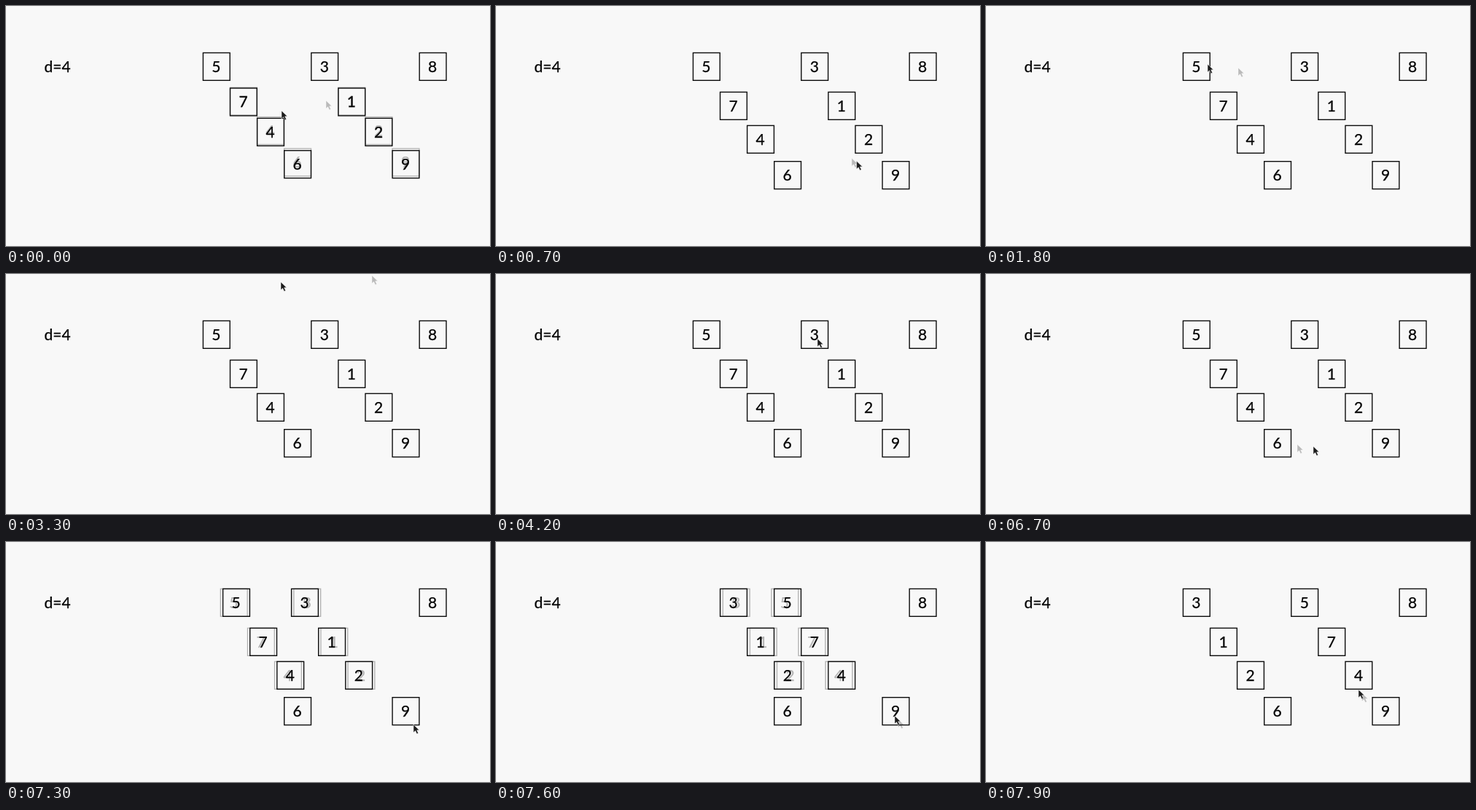
Write an HTML page that moves like this. It is 664x330 px and loops after 8 s.

```html
<!DOCTYPE html>
<html lang="en">
<head>
<meta charset="utf-8">
<title>Shell sort, gap 4</title>
<style>
  html, body { margin: 0; width: 100%; height: 100%; overflow: hidden; background: #f8f8f8; }
  svg { display: block; width: 664px; height: 330px; }
  text { font: 21px Lato, Carlito, sans-serif; fill: #000; stroke: #000; stroke-width: .25; }
  .box text { text-anchor: middle; }
  .box rect { fill: none; stroke: #0c0c0c; stroke-width: 1.4; }
  .ghost { opacity: .28; }
  .arrow { fill: #1c1c1c; stroke: #f8f8f8; stroke-width: .5; }
</style>
</head>
<body>
<svg viewBox="0 0 664 330">
  <text x="52.5" y="90.8">d=4</text>
  <g id="stage"></g>
</svg>
<script>
const LOOP = 8000, STEP = 100;
const GAP = 4, LEFT = 270.4, TOP = 64.4, COLUMN = 37.1;
const rows = [0, 54, 100, 149.3];
const digits = [...'574631298'];
const MOVE = 750, DROP_AT = -603, SWAP_AT = 7095;
const BOX_LAG = 14, ARROW_LAG = 40;

// pointer stops: time, x, y
const stops = [
  [-40, 439, 130], [0, 378, 144], [900, 528, 233], [1000, 566, 233],
  [1300, 566, 233], [1760, 346, 85], [1800, 304, 80], [2200, 285, 95],
  [2500, 137, 76], [3100, 628, 115], [3260, 502, 2], [3300, 377, 11],
  [3400, 178, 75], [3500, 331, 131], [4000, 441, 89], [4500, 441, 89],
  [4700, 562, 60], [5100, 258, 85], [5600, 338, 159], [6300, 500, 190],
  [6600, 394, 230], [6900, 559, 251], [7500, 559, 251], [7900, 511, 203]
];

const stage = document.getElementById('stage');

function add(parent, tag, attrs) {
  const el = document.createElementNS('http://www.w3.org/2000/svg', tag);
  for (const name in attrs) el.setAttribute(name, attrs[name]);
  return parent.appendChild(el);
}

function makeLayer(name) {
  const layer = add(stage, 'g', { class: name });
  const tiles = digits.map(digit => {
    const g = add(layer, 'g', { class: 'box' });
    add(g, 'rect', { width: 36.8, height: 37.9 });
    add(g, 'text', { x: 18, y: 26.4 }).textContent = digit;
    return g;
  });
  const arrow = add(layer, 'path', { class: 'arrow', d: 'M0 0V11L2.6 8.6L4.6 12.8L6.6 11.9L4.7 7.8H8Z' });
  return { tiles, arrow };
}

const ghost = makeLayer('ghost'), solid = makeLayer('solid');

function ease(t, start) {
  const u = Math.min(1, Math.max(0, (t - start) / MOVE));
  return u * u * (3 - 2 * u);
}

// Boxes drop into one row per subsequence, then the first three of each group trade places.
function boxAt(i, t) {
  const row = i % GAP;
  const jump = i === digits.length - 1 || row === GAP - 1 ? 0 : i < GAP ? GAP : -GAP;
  return [
    LEFT + COLUMN * (i + jump * ease(t, SWAP_AT)),
    TOP + rows[row] * ease(t, DROP_AT)
  ];
}

function arrowAt(t) {
  const i = Math.max(1, stops.findIndex(stop => stop[0] >= t));
  const [t0, x0, y0] = stops[i - 1], [t1, x1, y1] = stops[i];
  const u = (t - t0) / (t1 - t0);
  return [x0 + (x1 - x0) * u, y0 + (y1 - y0) * u];
}

// The trailing copy shows only while its part is moving.
function place(main, trail, now, before) {
  main.setAttribute('transform', `translate(${now})`);
  trail.setAttribute('transform', `translate(${before})`);
  const moved = Math.hypot(now[0] - before[0], now[1] - before[1]) > .3;
  trail.setAttribute('visibility', moved ? 'visible' : 'hidden');
}

function draw(t) {
  digits.forEach((_, i) =>
    place(solid.tiles[i], ghost.tiles[i], boxAt(i, t), boxAt(i, t - BOX_LAG)));
  place(solid.arrow, ghost.arrow, arrowAt(t), arrowAt(t - ARROW_LAG));
}

const start = performance.now();
function tick() {
  const t = (performance.now() - start) % LOOP;
  draw(Math.floor(t / STEP) * STEP);
  requestAnimationFrame(tick);
}
tick();
</script>
</body>
</html>
```
